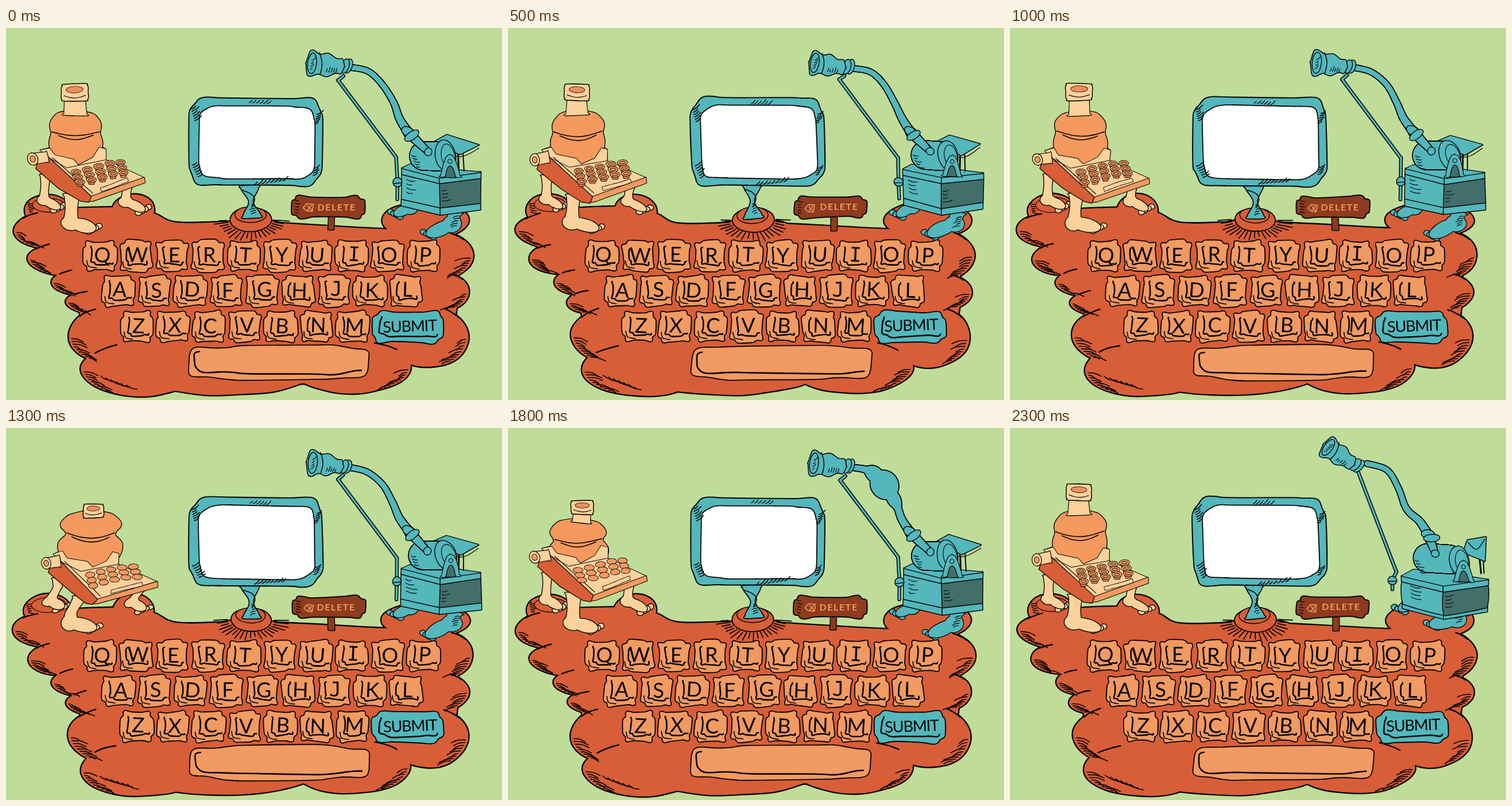
An HTML page with a canvas for the animation above (2400 ms loop, 864 by 648 pixels).

```html
<!DOCTYPE html>
<html lang="en">
<head>
<meta charset="utf-8">
<title>Keyboard mound</title>
<style>
html, body { margin: 0; width: 100%; height: 100%; overflow: hidden; background: #bfdd99; }
canvas { display: block; width: 864px; height: 648px; }
</style>
</head>
<body>
<canvas id="stage" width="864" height="648"></canvas>
<script>
const c = document.getElementById('stage').getContext('2d');
const BG = '#bfdd99', RED = '#d85e38', KEY = '#f19a61', PEACH = '#fcd29c',
  TEAL = '#53b7bc', DARK = '#426f6b', BROWN = '#8e3b1e', INK = '#080605';
const { sin, cos, abs, sign, min, max, hypot, atan2, floor, PI } = Math;

let boil = 0;             // which of three redrawn line versions is showing
let warp = p => p;        // bends points while a pose is held

const lerp = (a, b, k) => a + (b - a) * k;
const between = (p, q, k) => [lerp(p[0], q[0], k), lerp(p[1], q[1], k)];
const pulse = (t, peak, width) => max(0, 1 - abs(t - peak) / width);
const bump = (t, mid, width) => Math.exp(-(((t - mid) / width) ** 2));
const range = (n, f) => Array.from({ length: n }, (_, i) => f(i));
const hash = (x, y) => {
  const s = sin(x * 12.9898 + y * 78.233) * 43758.5453;
  return s - floor(s) - 0.5;
};
// "x y, x y" to points
const pts = text => text.split(',').map(s => s.trim().split(' ').map(Number));

// smooth displacement that changes with each line version
function boiled(p) {
  const [x, y] = warp(p);
  return [x + sin(x * 0.06 + y * 0.04 + boil * 2.1), y + sin(y * 0.06 - x * 0.05 + boil * 4.2)];
}

// ---- outlines as rules -------------------------------------------------
const ring = (x, y, rx, ry = rx, rot = 0) => range(18, i => {
  const a = i * PI / 9, u = cos(a) * rx, v = sin(a) * ry;
  return [x + u * cos(rot) - v * sin(rot), y + u * sin(rot) + v * cos(rot)];
});

// puffy rounded box
const puff = (x, y, rx, ry, lump = 2, seed = 0, power = 5) => range(40, i => {
  const a = (i + 0.5) * PI / 20, e = 2 / power, k = lump * sin(a * 6 + seed);
  return [x + sign(cos(a)) * abs(cos(a)) ** e * (rx + k), y + sign(sin(a)) * abs(sin(a)) ** e * (ry + k)];
});

// turned solid from a to b, half width given along the axis
function lathe(a, b, width) {
  const d = hypot(b[0] - a[0], b[1] - a[1]), nx = (a[1] - b[1]) / d, ny = (b[0] - a[0]) / d;
  const side = s => range(17, i => {
    const [x, y] = between(a, b, i / 16), w = width(i / 16) * s;
    return [x + nx * w, y + ny * w];
  });
  return [...side(1), ...side(-1).reverse()];
}

// cut corners, so that a smooth curve through them is a cushion
const soften = p => p.flatMap((a, i) => {
  const b = p[(i + 1) % p.length];
  return [between(a, b, 0.12), between(a, b, 0.88)];
});

// ---- drawing -----------------------------------------------------------
function trace(points, closed = true, smooth = true) {
  const p = points.map(boiled), n = p.length;
  const at = i => closed ? p[(i + n) % n] : p[max(0, min(n - 1, i))];
  c.beginPath();
  c.moveTo(...p[0]);
  for (let i = 0; i < (closed ? n : n - 1); i++) {
    const [a, b, d, e] = [at(i - 1), at(i), at(i + 1), at(i + 2)];
    if (smooth) c.bezierCurveTo(b[0] + (d[0] - a[0]) / 6, b[1] + (d[1] - a[1]) / 6,
      d[0] - (e[0] - b[0]) / 6, d[1] - (e[1] - b[1]) / 6, ...d);
    else c.lineTo(...d);
  }
  if (closed) c.closePath();
}

function ink(lw, color = INK) {
  c.strokeStyle = color;
  c.lineWidth = lw;
  c.stroke();
}

// parts share one outline, heavier on its lower left like a brush line
function merge(parts, fill, lw = 1.7, smooth = true) {
  for (const p of parts) {
    trace(p, true, smooth);
    c.save();
    c.translate(-lw * 0.25, lw * 0.25);
    ink(lw * 2);
    c.restore();
  }
  c.fillStyle = fill;
  for (const p of parts) {
    trace(p, true, smooth);
    c.fill();
  }
}
const shape = (p, fill, lw) => merge([p], fill, lw);
const poly = (p, fill, lw = 1.5) => merge([p], fill, lw, false);
function line(p, lw = 2, color) {
  trace(p, false);
  ink(lw, color);
}

function hatch(x, y, dx, dy, lx, ly, n, lw = 1.6) {
  for (let i = 0; i < n; i++) {
    const k = 0.8 + hash(x + i, y + boil) * 0.6, a = x + dx * i, b = y + dy * i;
    line([[a, b], [a + lx * k * 0.5 - ly * 0.08, b + ly * k * 0.5 + lx * 0.08], [a + lx * k, b + ly * k]], lw);
  }
}

// circles of changing radius along a curve
function tube(points, radius) {
  const p = points.map(boiled), n = p.length - 1, at = i => p[max(0, min(n, i))];
  const dots = range(121, k => {
    const i = min(n - 1, floor(k / 120 * n)), t = k / 120 * n - i;
    const [a, b, d, e] = [at(i - 1), at(i), at(i + 1), at(i + 2)];
    const f = j => b[j] + t * ((d[j] - a[j]) / 2 + t * ((2 * a[j] - 5 * b[j] + 4 * d[j] - e[j]) / 2 + t * (3 * b[j] - a[j] - 3 * d[j] + e[j]) / 2));
    return [f(0), f(1), radius(k / 120)];
  });
  for (const [color, extra] of [[INK, 1.8], [TEAL, 0]]) {
    c.fillStyle = color;
    for (const [x, y, r] of dots) {
      c.beginPath();
      c.arc(x, y, r + extra, 0, 7);
      c.fill();
    }
  }
}

// leg with a bare foot; (dx, dy) runs from heel to toes
function limb(hip, heel, r, dx, dy, fill) {
  const [x, y] = heel, len = hypot(dx, dy), dir = sign(dx);
  for (let i = 3; i >= 0; i--)
    shape(ring(x + dx * 0.95 + dir * (i - 1.5) * 6, y + dy + 5 - i * 3, 5, 4), fill, 1.4);
  merge([lathe(hip, heel, t => r * (1 - 0.25 * sin(t * PI))), ring(x, y + 1, r + 3, r),
    ring(x + dx * 0.48, y + dy * 0.5, len * 0.55, r * 0.85, atan2(dy * dir, dx * dir))], fill, 1.4);
}

function word(s, x, y, font, color, rot = 0, gap = 0) {
  c.save();
  c.translate(...boiled([x, y]));
  c.rotate(rot);
  c.font = font;
  c.letterSpacing = gap + 'px';
  c.textAlign = 'center';
  c.textBaseline = 'middle';
  c.fillStyle = color;
  c.fillText(s, 0, 0);
  c.restore();
}

// ---- mound -------------------------------------------------------------
const CORE = pts('60 330, 190 312, 255 322, 300 340, 420 338, 530 343, 660 350, 770 350, 770 540, 600 610, 300 620, 150 580, 120 420');
const LEFT = pts('85 352 72 32, 100 402 62 28, 140 443 60 24, 165 478 61 22, 190 535 81 50, 235 595 105 46');
const RIGHT = pts('750 396 63 43, 750 460 57 34, 735 538 70 53, 600 590 105 46');
const HILLS = pts('72 318 40 28, 222 318 36 28, 731 335 76 31, 380 590 170 49, 427 350 68 16');

function mound() {
  merge([CORE, ...[...LEFT, ...RIGHT, ...HILLS].map(e => ring(...e))], RED, 2.4);
  for (const [lobes, dir] of [[LEFT, -1], [RIGHT, 1]]) for (const [x, y, rx, ry] of lobes) {
    const rim = a => [x + dir * cos(a) * rx, y + sin(a) * ry];
    line(range(6, i => rim(-0.7 - i * 0.09)), 2.4);
    const n = 4 + floor(ry / 9);
    for (let i = 0; i < n; i++) {
      const [a, b] = rim(0.1 + i * 0.9 / n), k = 24 + hash(a, b + boil) * 14;
      line([[a - dir * 5, b], [a - dir * k * 0.6, b + 1], [a - dir * k, b + 6]], 1.7);
    }
  }
  hatch(36, 304, 1, 4, 11, 3, 5);
  hatch(165, 606, 9, 3, 24, 10, 6);
  shape(ring(74, 308, 28, 12), RED, 1.2);
}

// ---- monitor -----------------------------------------------------------
function monitor() {
  for (let i = 0; i < 21; i++) {
    const a = PI * (0.02 + 0.048 * i), near = 1.12 + hash(i, boil) * 0.1, far = 1.65 + hash(i, boil + 9) * 0.4;
    line([near, far].map(k => [427 + cos(a) * 37 * k, 333 + sin(a) * 21 * k]), 1.8);
  }
  shape(ring(427, 334, 35, 20), RED, 2);
  shape(ring(426, 326, 26, 13), RED, 1.5);
  shape(lathe([425, 274], [428, 331], t => 9 + 6 * cos(t * 2 * PI)), TEAL, 1.8);
  line(pts('413 282, 427 288, 433 298, 428 312'), 1.6);
  hatch(432, 306, 0.6, 4, -8, 3, 5, 1.3);
  shape(puff(435, 198, 114, 77, 2, 1, 7), TEAL, 2);
  shape(puff(437, 199, 100, 63, 1, 0, 7), '#fff', 1.8);
  hatch(323, 142, 1, 4, 11, -8, 6);
  hatch(325, 240, 2, 4, 11, -7, 6);
  hatch(424, 131, 6, 0.4, 8, -7, 6, 1.3);
  hatch(432, 273, 7, -0.8, 9, -8, 8);
  hatch(537, 166, 1, -4, 10, -6, 5);
  hatch(536, 256, 1, -4, 10, -6, 4);
}

function board() {
  poly(lathe([567, 326], [567, 352], () => 5), BROWN);
  shape(puff(562, 312, 61, 18, 2, 2, 6), BROWN, 2);
  hatch(505, 301, 0, 5, 8, 1, 5, 1.3);
  trace(pts('518 314, 524 307, 535 308, 533 320, 523 319'), true, false);
  ink(1.6, KEY);
  for (const s of [-1, 1]) line([[525, 314 - 4 * s], [532, 314 + 4 * s]], 1.6, KEY);
  word('DELETE', 576, 313, 'bold 16px Lato, "Open Sans", sans-serif', KEY, 0, 1.6);
}

// ---- keys --------------------------------------------------------------
const ROWS = [['QWERTYUIOP', 164, 397], ['ASDFGHJKL', 196, 458], ['ZXCVBNM', 228, 520]];

// raised cushion: outline plus the left and lower edge of its face
function cushion(x, y, rx, ry, fill, inset, seed) {
  shape(puff(x, y, rx, ry, 2, seed), fill, 1.9);
  const face = puff(x + inset * 0.4, y - inset * 0.3, rx - inset, ry - inset, 1.5, seed + 2);
  line(face.slice(3, 24), 2.6);
}

function letterKey(ch, x, y) {
  const seed = hash(x, y) * 6;
  cushion(x, y, 26.5, 25.5, KEY, 8, seed);
  line([[x - 23, y + 9], [x - 20, y + 19], [x - 7, y + 22]], 1.7);
  const mono = 'IJ'.includes(ch);
  word(ch, x + 3, y, mono ? '35px "DejaVu Sans Mono", monospace' : '36px Lato, "Open Sans", sans-serif', INK, 0.03 + seed * 0.015);
}

function keyboard() {
  for (const [row, x, y] of ROWS) [...row].forEach((ch, i) => letterKey(ch, x + i * 62.6, y));
  cushion(700, 521, 60, 27, TEAL, 8, 1);
  word('SUBMIT', 703, 520, '27px Lato, "Open Sans", sans-serif', INK, -0.04, -1.2);
  cushion(476, 583, 157, 28, KEY, 7, 4);
}

// ---- walking typewriter ------------------------------------------------
// vat: middle, top, bottom, half width, pinch; pipe: middle, rim, size
const REST = [122, 142, 238, 47, 4, 120, 112, 1];
const FAT = [147, 143, 243, 57, 15, 153, 145, 0.78];
const LOW = [123, 157, 247, 52, 9, 129, 138, 0.82];
const TALL = [122, 80, 236, 38, 4, 120, 33, 0.95];

function typewriter(fat, low, tall) {
  const lean = ([x, y]) => {
    const k = max(0, min(1, (322 - y) / 50));
    return [x + 23 * fat * k, y + (6 * fat - 3 * low) * k];
  };
  const [mid, top, bottom, wide, pinch, px, py, s] = REST.map((v, i) =>
    v + (FAT[i] - v) * fat + (LOW[i] - v) * low + (TALL[i] - v) * tall);

  warp = lean;
  limb([68, 256], [66, 298], 9, 28, 14, PEACH);
  limb([212, 274], [209, 301], 9, 31, 15, PEACH);
  limb([115, 290], [112, 338], 13, 44, 11, PEACH);
  poly(pts('60 213, 76 208, 165 206, 174 212, 173 240, 100 246'), PEACH, 1);

  warp = p => p;
  const girth = t => wide * max(0, 1 - abs(2 * t - 1) ** 3.2) ** 0.5 - pinch * bump(t, 0.42, 0.1);
  shape(lathe([mid, top], [mid, bottom], t => max(0, girth(t))), '#f5995f', 1.4);
  for (const [t, k] of [[0.4, 0.97], [0.47, 0.7]]) {
    const y = lerp(top, bottom, t), w = girth(t) * k;
    line(range(7, i => [mid + w * (i / 3 - 1), y + 8 * sin(i * PI / 6)]), 1.6);
  }
  const foot = top + 10 * s;
  shape(lathe([px, py], [lerp(px, mid, 0.3), foot], t => s * (17 + 2 * t * t)), PEACH, 1.2);
  shape(lathe([px, py - 14 * s], [px, py + 14 * s], t => s * (25 - 3 * sin(t * PI) - 7 * abs(2 * t - 1) ** 4)), PEACH, 1.5);
  shape(ring(px, py - 5 * s, 14 * s, 5 * s), '#ef8f5c', 0.8);
  line(range(5, i => [px + s * (i * 9 - 18), py + s * (5 + 4 * sin(i * PI / 4))]), 1.2);

  warp = lean;
  poly(pts('60 213, 76 209, 84 221, 118 228, 127 238, 152 226, 163 209, 174 212, 173 238, 106 247, 72 226'), PEACH, 1);
  poly(pts('72 226, 106 244, 174 231, 240 261, 148 296'), PEACH, 1);
  poly(pts('148 294, 241 261, 242 270, 152 302, 140 303'), KEY, 1.1);
  poly(pts('52 245, 57 231, 72 225, 147 294, 143 304, 130 302, 92 279'), RED, 1.3);
  line([[80, 226], [150, 288]], 1.2);
  shape(lathe([47, 229], [72, 225], () => 9), PEACH, 1.2);
  shape(ring(47, 229, 8, 10, -0.3), PEACH, 1.2);
  shape(ring(47, 229, 4, 5, -0.3), KEY, 0.9);

  // keys stand like cups and flatten when the machine is squashed
  const h = 8 * max(0, 1 - fat - low);
  for (let r = 0; r < 3; r++) for (let i = 4; i >= (r ? 0 : 0); i--) {
    const x = 123 + 19 * i + 3 * r, y = 250 - 4.6 * i + 9 * r + 3 * pulse(i, 4, 1);
    if (h > 2) poly([[x - 7, y], [x + 7, y], [x + 4, y + h], [x - 4, y + h]], '#df7c4a', 0.9);
    shape(ring(x, y, 8, 4.4), KEY, 0.9);
    if (h > 2) line(ring(x, y, 5, 2), 1);
  }
  poly(lathe([165, 281], [213, 265], () => 3), PEACH, 0.9);
  warp = p => p;
}

// ---- teal lamp ---------------------------------------------------------
// each in three poses: resting, slumped, recoiling
const ARM = ['598 69, 630 76, 655 98, 674 130, 686 158, 702 182', '655 62, 672 82, 702 92, 719 118, 722 150, 726 184', '622 62, 656 74, 677 104, 690 140, 714 162, 730 186'].map(pts);
const ROD = ['578 90, 680 226, 681 268', '620 68, 680 247, 667 263', '605 70, 674 250, 667 266'].map(pts);
const HEAD = ['560 62, 0 1, 1 0', '603 47, .15 1.3, .7 0', '577 46, .45 1, .95 0'].map(pts);

function lamp(slump, recoil, bulge) {
  const q = slump + recoil;
  const pose = set => set[0].map((p, i) => p.map((v, j) => v + (set[1][i][j] - v) * slump + (set[2][i][j] - v) * recoil));
  const blend = (a, b) => pts(a).map((p, i) => between(p, pts(b)[i], q));

  limb([704, 300], [704, 313 - 9 * q], 10, -27, 12, TEAL);
  limb([782, 320], [777, 340 - 8 * q], 14, -44, 20 - 8 * q, TEAL);
  hatch(790, 328 - 8 * q, -1, 4, -12, 3, 5, 1.2);

  // stacked slabs seen from a corner; the middle one turns into a cushion
  const corner = [[689 - 6 * q, 245 + 12 * q], [756, 261 + 14 * q], [827 + 5 * q, 252 + 11 * q]];
  const slab = (dy, h, side, soft) => {
    for (const i of [0, 1]) {
      const [a, b] = [corner[i], corner[i + 1]].map(([x, y]) => [x, y + dy * (1 - 0.12 * q)]);
      const face = [a, b, [b[0], b[1] + h], [a[0], a[1] + h]], fill = i ? side : TEAL;
      soft ? shape(soften(face), fill, 1.5) : poly(face, fill);
    }
  };
  slab(53, 11, TEAL);
  slab(10, 42, DARK, q > 0.5);
  hatch(697, 264 + 10 * q, 0.4, 7, 17, 4, 4, 1.2);
  hatch(759, 284 + 9 * q, 0, 6, 14, -2, 4, 1.1);
  slab(0, 10, TEAL);
  poly([corner[0], [703, 238 + 8 * q], [778, 246 + 10 * q], corner[2], corner[1]], TEAL, 1.3);

  // crank plate and motor
  line(blend('788 216, 788 248', '818 222, 820 252'), 3);
  line(blend('796 212, 797 249', '824 220, 825 252'), 2);
  poly(blend('768 187, 823 203, 791 221, 742 200', '797 196, 830 190, 827 232, 790 216'), TEAL);
  line(blend('746 205, 790 225, 823 209', '798 200, 814 212, 828 194'), 1.3);
  const o = 17 * q, d = 9 * q;
  tube([[727, 222 + d * 0.6], [754 + o * 0.6, 223 + d * 0.6]], () => 24);
  hatch(706, 222 + d, 2, 5, 10, 2, 5, 1.2);
  shape(ring(766 + o, 222 + d, 17, 26, -0.25), TEAL, 1.4);
  shape(ring(771 + o, 223 + d, 11, 20, -0.25), TEAL, 1.1);
  const arch = (w, h, fill) => shape(lathe([774 + o, 259 + d - h], [774 + o, 259 + d], t => w * t ** 0.45), fill, 1.2);
  arch(16, 38, TEAL);
  arch(8, 19, DARK);
  shape(ring(774 + o, 232 + d, 3), TEAL, 1);

  // rod
  const [head, elbow, end] = pose(ROD);
  const tail = [end[0], end[1] + 30 - 14 * q];
  for (const [color, lw] of [[INK, 6.5], [TEAL, 3.4]]) {
    line([head, elbow], lw, color);
    line([elbow, end], lw, color);
    line([end, tail], lw, color);
    line([head, [head[0] + 9, head[1] - 7]], lw, color);
  }
  shape(ring(...end, 7), TEAL, 1.5);
  line([[end[0] - 6, end[1] + 2], [end[0] + 7, end[1] + 1]], 1.4);

  // arm
  const arm = pose(ARM), tip = arm[5], hub = [735 + 5 * q, 215 + 4 * q];
  tube([tip, hub], u => 8 - 4 * u);
  shape(ring(...hub, 6), TEAL, 1.3);
  tube(arm, u => 4.3 + 3 * u ** 3 + bump(u, bulge, 0.17) * (14 + 5 * sin(u * 34)));
  shape(ring(tip[0] - 1, tip[1] - 2, 11, 7, 0.55 - 0.4 * q), TEAL, 1.5);
  shape(ring(tip[0] + 5, tip[1] + 5, 13, 6, -0.6 + 0.5 * q), TEAL, 1.4);

  // shade
  const [[x, y], [rot, sx], [sy]] = pose(HEAD);
  c.save();
  c.translate(x, y);
  c.rotate(rot);
  c.scale(sx, sy);
  for (const k of [36, 30]) shape(ring(k, 5, 6, 12, 0.3), TEAL, 1.4);
  shape(lathe([-36, -2], [28, 6], t => (22 - 10 * t + 2.5 * sin(t * 14)) * (1 - abs(2 * t - 1) ** 8) ** 0.5), TEAL, 1.6);
  shape(ring(-26, -1, 7, 17, 0.12), TEAL, 1.4);
  line(range(6, i => [-13 + 4 * sin(i * PI / 5), -19 + 7.4 * i]), 1.5);
  hatch(-3, 14, 4, 0.3, 3, -8, 5, 1.2);
  hatch(-29, 9, 1, -5, 6, -5, 4, 1.2);
  c.restore();
}

function draw(step) {
  boil = step % 3;
  c.fillStyle = BG;
  c.fillRect(0, 0, 864, 648);
  mound();
  monitor();
  board();
  keyboard();
  // a swallowed lump runs down the arm before the lamp slumps
  const bulge = step > 16 && step < 20 ? 0.04 + (step - 17) * 0.36 : -1;
  lamp(pulse(step, 21, 2), pulse(step, 23, 2), bulge);
  typewriter(pulse(step, 13, 2), pulse(step, 18, 2), pulse(step, 15, 2));
}

c.lineJoin = c.lineCap = 'round';
const start = performance.now();
let shown = -1;
function tick() {
  const step = floor((performance.now() - start) % 2400 / 100);
  if (step !== shown) draw(shown = step);
  requestAnimationFrame(tick);
}
tick();
</script>
</body>
</html>
```
